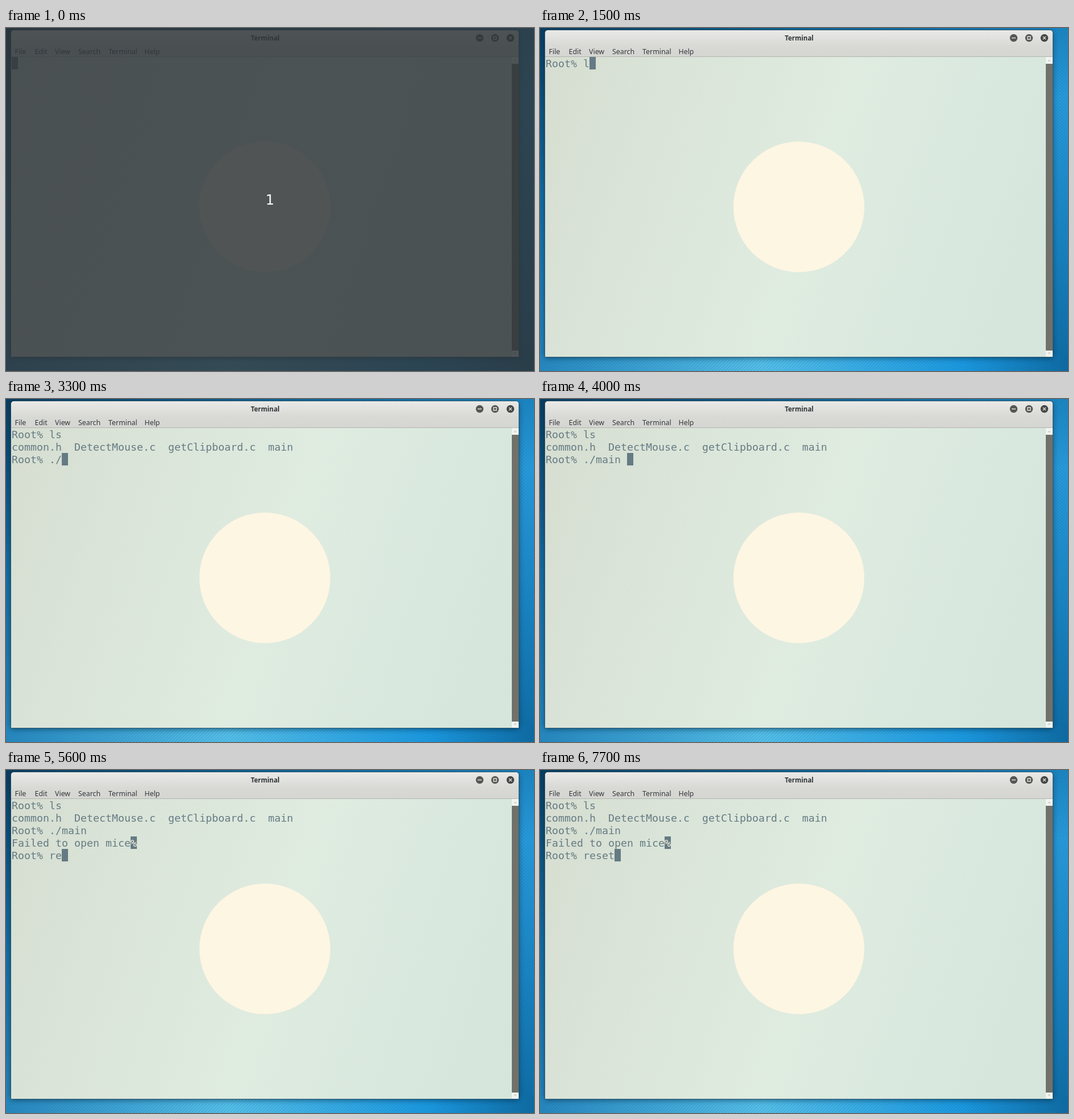
An HTML page that plays this animation: 928 by 604 pixels, repeating every 8000 ms.

```html
<!DOCTYPE html>
<html lang="en">
<head>
<meta charset="utf-8">
<title>Terminal session</title>
<style>
  html, body { margin: 0; width: 100%; height: 100%; overflow: hidden; background: #1478b0; }
  svg { display: block; }
  text { white-space: pre; }
  .ui { font: 12.4px "Noto Sans", "Open Sans", sans-serif; fill: #33393b; }
  .title { font-size: 11.5px; font-weight: 700; text-anchor: middle; fill: #2e3436; }
  .term { font: 18.27px "DejaVu Sans Mono", monospace; fill: #657b83; }
  .count { font: 24px "DejaVu Sans", sans-serif; fill: #fff; text-anchor: middle; }
</style>
</head>
<body>
<svg width="928" height="604" viewBox="0 0 928 604">
  <defs>
    <linearGradient id="top">
      <stop stop-color="#0a3e60"/><stop offset=".5" stop-color="#10689a"/><stop offset="1" stop-color="#1c86c2"/>
    </linearGradient>
    <linearGradient id="bottom">
      <stop stop-color="#2789c0"/><stop offset=".42" stop-color="#55c0ea"/>
      <stop offset=".8" stop-color="#1b9ae2"/><stop offset="1" stop-color="#0f6ca4"/>
    </linearGradient>
    <linearGradient id="left" x2="0" y2="1">
      <stop stop-color="#0a3e60"/><stop offset=".5" stop-color="#1470a6"/><stop offset="1" stop-color="#2789c0"/>
    </linearGradient>
    <linearGradient id="right" x2="0" y2="1">
      <stop stop-color="#1c86c2"/><stop offset=".2" stop-color="#289bdc"/>
      <stop offset=".6" stop-color="#1a85c4"/><stop offset="1" stop-color="#0f6ca4"/>
    </linearGradient>
    <linearGradient id="header" x2="0" y2="1">
      <stop stop-color="#e9e9e7"/><stop offset=".6" stop-color="#d8d8d5"/><stop offset="1" stop-color="#d5d5d2"/>
    </linearGradient>
    <linearGradient id="paper" gradientUnits="userSpaceOnUse" x1="9" y1="90" x2="889" y2="380">
      <stop stop-color="#d8dfd2"/><stop offset=".25" stop-color="#dce6da"/><stop offset=".55" stop-color="#e1ede1"/>
      <stop offset=".7" stop-color="#ddebe0"/><stop offset="1" stop-color="#d7e7dd"/>
    </linearGradient>
    <pattern id="hatch" width="4" height="4" patternUnits="userSpaceOnUse" patternTransform="rotate(45)">
      <rect width="1.6" height="4" fill="#063a5c"/>
    </pattern>
    <filter id="blur" x="-5%" y="-5%" width="110%" height="110%"><feGaussianBlur stdDeviation="4"/></filter>
  </defs>

  <rect width="928" height="604" fill="url(#left)"/>
  <rect width="928" height="8" fill="url(#top)"/>
  <rect x="895" width="33" height="604" fill="url(#right)"/>
  <rect y="574" width="928" height="30" fill="url(#bottom)"/>
  <rect width="928" height="604" fill="url(#hatch)" opacity=".13"/>
  <rect x="8" y="6" width="894" height="576" rx="5" fill="#02263e" opacity=".55" filter="url(#blur)"/>

  <path d="M8.5 579.5V9a5.5 5.5 0 0 1 5.5-5.5H896a5.5 5.5 0 0 1 5.5 5.5V579.5Z" fill="url(#paper)" stroke="#123a52" stroke-opacity=".7"/>
  <path d="M9 51V9a5 5 0 0 1 5-5H896a5 5 0 0 1 5 5V51Z" fill="url(#header)"/>
  <path d="M9 50.5H901" stroke="#b3b5af"/>
  <rect x="9" y="51" width="880" height="528" fill="url(#hatch)" opacity=".018"/>
  <circle cx="455" cy="315" r="115" fill="#fdf6e3"/>

  <g fill="#f1f4ef"><rect x="889" y="51" width="12" height="12"/><rect x="889" y="567" width="12" height="12"/></g>
  <path d="M892.5 58.5l2.5-3 2.5 3ZM892.5 571.5l2.5 3 2.5-3Z" fill="#c9ccc6"/>
  <rect x="889" y="63" width="12" height="505" fill="#70716a"/>

  <text class="ui title" x="455.5" y="22">Terminal</text>
  <g id="menu" class="ui"></g>
  <g fill="#555753"><circle cx="832.5" cy="17.5" r="6.7"/><circle cx="859.5" cy="17.5" r="6.7"/><circle cx="886.5" cy="17.5" r="6.7" fill="#454745"/></g>
  <path d="M829 17.5h7M857 15h5v5h-5ZM884 15l5 5m0-5l-5 5" fill="none" stroke="#e4e4e1" stroke-width="1.4"/>

  <g id="lines" class="term"></g>
  <g id="mark">
    <rect x="219" y="117" width="11" height="22" fill="#657b83"/>
    <text class="term" x="219" y="135" style="fill:#fdf6e3">%</text>
  </g>
  <rect id="cursor" width="11" height="22" fill="#657b83"/>

  <g id="cover">
    <rect width="928" height="604" fill="#2f3539" opacity=".835"/>
    <text class="count" x="464" y="311">1</text>
  </g>
</svg>
<script>
const LOOP = 8000, CELL = 11, ROW = 22, LEFT = 10, TOP = 51;
const PROMPT = 'Root% ';
const history = [
  PROMPT + 'ls',
  'common.h  DetectMouse.c  getClipboard.c  main',
  PROMPT + './main',
  'Failed to open mice'
];

// [start ms, finished lines, typed input (null: no prompt yet), cursor visible]
const steps = [
  [0, 0, null, true], [500, 0, null, false], [900, 0, '', false],
  [1500, 0, 'l', true], [1800, 2, '', true], [2400, 2, '', false],
  [2900, 2, '', true], [3000, 2, '.', true], [3300, 2, './', true],
  [3600, 2, './m', true], [4000, 2, './main ', true],
  [4400, 4, '', true], [5000, 4, '', false], [5500, 4, '', true],
  [5600, 4, 're', true], [5700, 4, 'res', true], [5900, 4, 'rese', true],
  [6000, 4, 'reset', true], [6400, 4, './main', true],
  [7500, 4, 'ls', true], [7700, 4, 'reset', true]
];

const byId = id => document.getElementById(id);
const show = (node, on) => node.setAttribute('visibility', on ? 'visible' : 'hidden');

function addText(parent, x, y, content = '') {
  const node = document.createElementNS('http://www.w3.org/2000/svg', 'text');
  node.setAttribute('x', x);
  node.setAttribute('y', y);
  node.textContent = content;
  return parent.appendChild(node);
}

const menu = { File: 15.5, Edit: 50.5, View: 86, Search: 127, Terminal: 180, Help: 243.5 };
for (const [label, x] of Object.entries(menu)) addText(byId('menu'), x, 45.5, label);

const rows = Array.from({ length: 5 }, (_, i) => addText(byId('lines'), LEFT, TOP + 18 + i * ROW));
const cursor = byId('cursor'), mark = byId('mark'), cover = byId('cover');
let current;

function render(ms) {
  const step = steps.findLast(([start]) => start <= ms);
  if (step === current) return;
  current = step;
  const [start, done, input, cursorOn] = step;
  const entry = input === null ? '' : PROMPT + input;
  rows.forEach((row, i) => {
    row.textContent = i < done ? history[i] : i === done ? entry : '';
  });
  cursor.setAttribute('x', LEFT + entry.length * CELL);
  cursor.setAttribute('y', TOP + done * ROW);
  show(cursor, cursorOn);
  show(mark, done === history.length);
  show(cover, start === 0);
}

const origin = performance.now();
function tick() {
  render((performance.now() - origin) % LOOP);
  requestAnimationFrame(tick);
}
tick();
</script>
</body>
</html>
```
